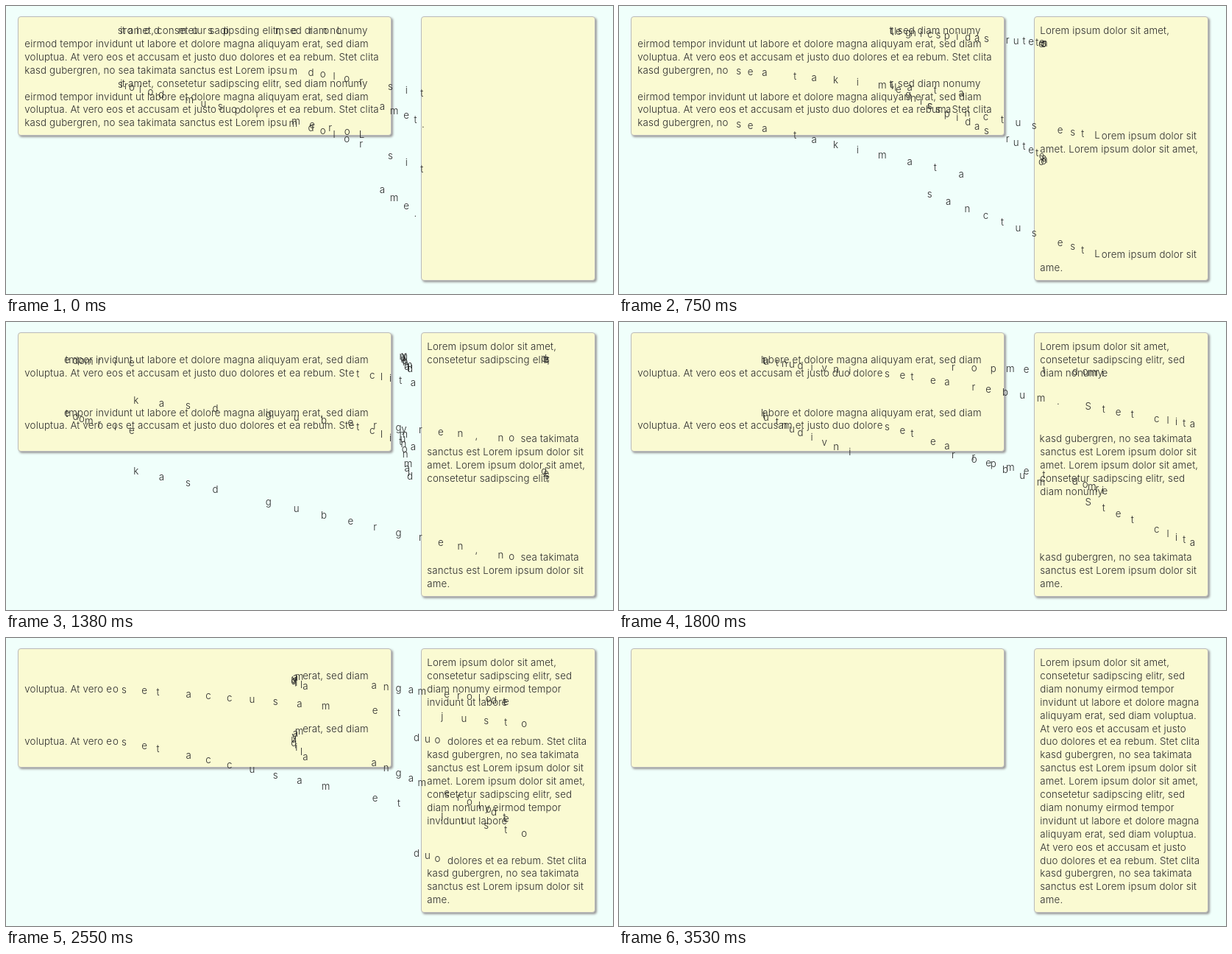
Write an HTML page with a canvas that moves like this. It is 825 px wide and 391 px high and loops after 3.83 s.

```html
<!DOCTYPE html>
<html lang="la">
<head>
<meta charset="utf-8">
<title>Letters moving between columns</title>
<style>
  html, body { margin: 0; width: 100%; height: 100%; overflow: hidden; background: #f0fffb; }
  .box {
    position: absolute; top: 14px; box-sizing: border-box;
    background: #fafad2; border: 1px solid #bbb; border-radius: 4px;
    box-shadow: 2px 2px 3px #999;
  }
  #wide { left: 16px; width: 508px; height: 162px; }
  #tall { left: 564px; width: 237px; height: 359px; }
  canvas { position: absolute; left: 0; top: 0; }
</style>
</head>
<body>
<div class="box" id="wide"></div>
<div class="box" id="tall"></div>
<canvas id="stage" width="825" height="391"></canvas>
<script>
const LOOP = 3830, LINE = 17.9, BASELINE = 38;
const FLIGHT = 28.5;   // letters released while one is on its way
const BACK_LAG = 2;    // letters by which the back end trails the front
const ctx = document.getElementById('stage').getContext('2d');
ctx.font = '300 13.3px Inter, sans-serif';
ctx.letterSpacing = '0.16px';
ctx.fillStyle = '#2b2b2b';

const passage = 'Lorem ipsum dolor sit amet, consetetur sadipscing elitr, sed diam nonumy ' +
  'eirmod tempor invidunt ut labore et dolore magna aliquyam erat, sed diam ' +
  'voluptua. At vero eos et accusam et justo duo dolores et ea rebum. Stet clita ' +
  'kasd gubergren, no sea takimata sanctus est Lorem ipsum dolor sit amet.';
const text = passage + ' ' + passage.replace('amet.', 'ame.');
const period = passage.length + 1, last = passage.length - 1;

// Word-wraps the text and returns the place of every character.
function layout(left, width) {
  const places = [];
  let line = '', row = 0;
  for (const word of text.split(' ')) {
    if (line && ctx.measureText(line + word).width > width) {
      line = '';
      row++;
    }
    for (const ch of word + ' ') {
      const x = left + ctx.measureText(line + ch).width - ctx.measureText(ch).width;
      places.push({ x, y: Math.round(BASELINE + row * LINE) });
      line += ch;
    }
  }
  return places;
}

const from = layout(25.3, 493), to = layout(572.3, 222);

// Each passage empties from both ends towards its middle.
const letters = [...text].map((ch, i) => {
  const n = i % period;
  const order = n > last / 2 ? last - n + BACK_LAG : n;
  return { ch, order, a: from[i], b: to[i] };
}).filter(l => l.ch !== ' ');

// Pace of release: [time, letters released].
const pace = [[0, 19.5], [750, 55], [2930, 148], [3530, 178]];

function released(t) {
  const k = Math.max(1, pace.findIndex(([time]) => time >= t));
  const [t0, n0] = pace[k - 1], [t1, n1] = pace[k];
  return n0 + (n1 - n0) * (t - t0) / (t1 - t0);
}

const swing = u => 0.5 - Math.cos(Math.PI * Math.max(0, Math.min(1, u))) / 2;

function draw(t) {
  const head = released(Math.min(t, 3530));
  ctx.clearRect(0, 0, 825, 391);
  for (const { ch, order, a, b } of letters) {
    const p = swing((head - order) / FLIGHT);
    ctx.fillText(ch, a.x + (b.x - a.x) * p, a.y + (b.y - a.y) * p);
  }
}

const start = performance.now();
function play() {
  draw((performance.now() - start) % LOOP);
  requestAnimationFrame(play);
}
play();
</script>
</body>
</html>
```
